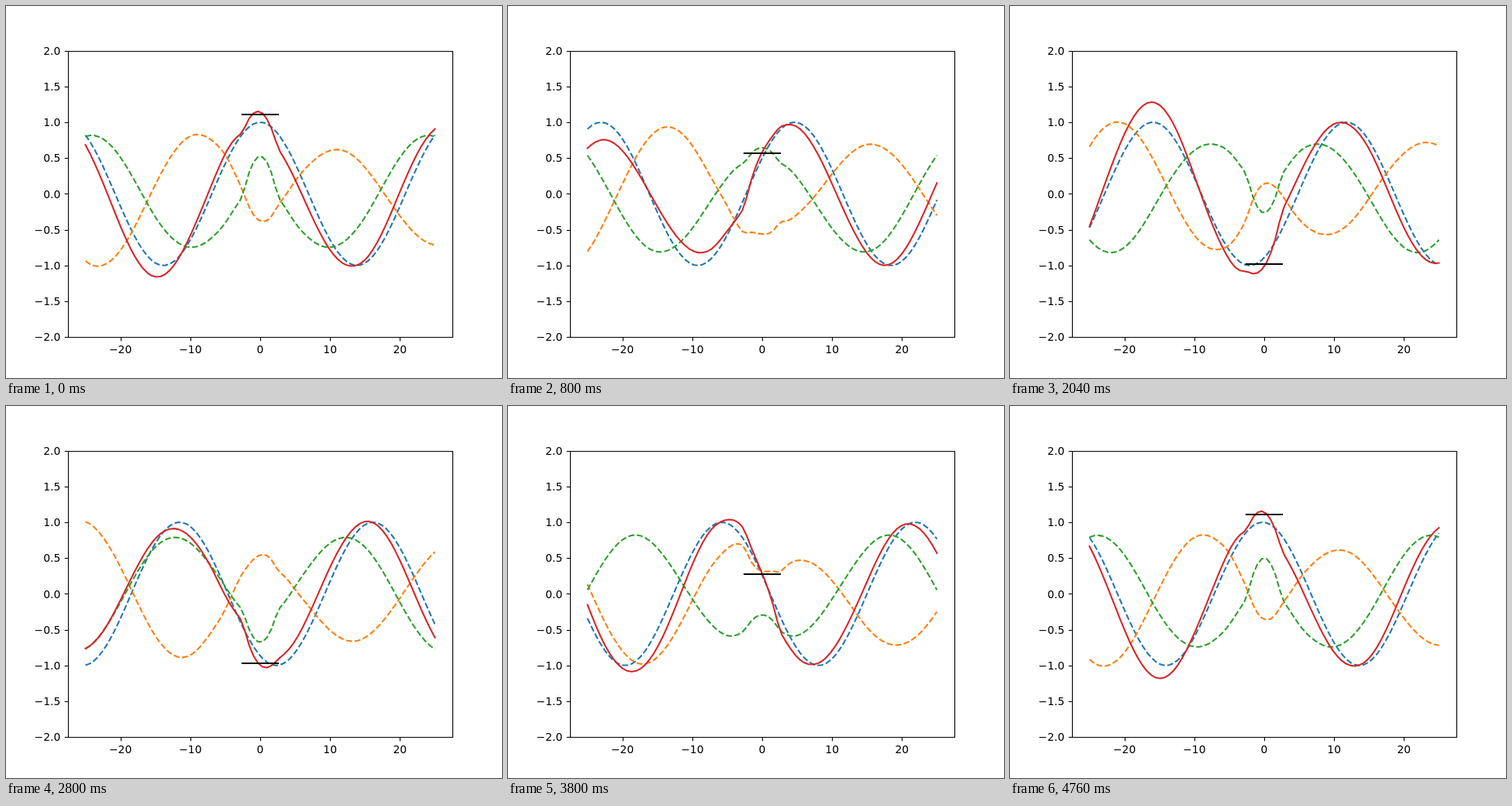
These frames come from a looping animation (640 by 480 pixels, 4.8 s). An HTML page with a canvas:

```html
<!DOCTYPE html>
<html lang="en">
<head>
<meta charset="utf-8">
<title>Waves around a floating body</title>
<style>
html, body { margin: 0; width: 640px; height: 480px; overflow: hidden; background: #fff; }
canvas { display: block; }
</style>
</head>
<body>
<canvas id="plot" width="640" height="480"></canvas>
<script>
const ctx = document.getElementById('plot').getContext('2d');
const FRAME_MS = 40, FRAMES = 120, POINTS = 80;
const REACH = 25, HALF_BODY = 2.5, WAVE_NUMBER = 0.22697;
const HEAVE = [1.11, 0.01];
const PX = 100 / 72;  // one typographic point
const DASH = [5.55 * PX, 2.4 * PX];

const toX = x => 328 + x * 496 / 55;
const toY = y => 242.4 - y * 92.4;
const crisp = v => Math.floor(v + 0.5) + 0.5;

// Outgoing-wave envelopes, sampled every 2.5 units from the edge of the body.
const heaveWave = {
  size: [.52, .64, .70, .756, .795, .815, .822, .822, .819, .816],
  phase: [1.08, 1.12, 1.09, 1.04, .965, .90, .865, .843, .822, .804]
};
const scatterRight = {
  size: [.383, .471, .545, .605, .655, .69, .71, .717, .719, .718],
  phase: [-2.57, -2.313, -2.29, -2.315, -2.36, -2.395, -2.455, -2.525, -2.585, -2.626]
};
const scatterLeft = {
  size: [.676, .745, .80, .865, .92, .96, .985, 1, 1.008, 1.015],
  phase: [-2.068, -1.89, -1.895, -1.9, -1.925, -1.97, -2.015, -2.06, -2.11, -2.139]
};

// Catmull-Rom interpolation with straight extension past both ends.
function sample(list, u) {
  const last = list.length - 1;
  const i = Math.min(Math.floor(u), last - 1), t = u - i;
  const b = list[i], c = list[i + 1];
  const a = i > 0 ? list[i - 1] : 2 * b - c;
  const d = i + 2 <= last ? list[i + 2] : 2 * c - b;
  return b + t / 2 * (c - a + t * (2 * a - 5 * b + 4 * c - d + t * (3 * (b - c) + d - a)));
}

const polar = (r, p) => [r * Math.cos(p), r * Math.sin(p)];

function outgoing(wave, distance) {
  const u = (distance - HALF_BODY) / 2.5;
  return polar(sample(wave.size, u), sample(wave.phase, u) + WAVE_NUMBER * distance);
}

const incident = x => polar(1, WAVE_NUMBER * x);

function scattered(x) {
  if (Math.abs(x) > HALF_BODY) return outgoing(x > 0 ? scatterRight : scatterLeft, Math.abs(x));
  return [
    -.38 - .042 * x + .052 * x * x,
    -.43 + .01 * x - .0128 * x * x + .0089 * x ** 3
  ];
}

function radiated(x) {
  if (Math.abs(x) > HALF_BODY) return outgoing(heaveWave, Math.abs(x));
  return [.525 - .09 * x * x, .444 + .012 * x * x];
}

const xs = Array.from({ length: POINTS }, (_, i) => -REACH + 2 * REACH * i / (POINTS - 1));
const parts = [incident, scattered, radiated].map(field => xs.map(field));
const total = xs.map((_, i) => [0, 1].map(j => parts.reduce((sum, part) => sum + part[i][j], 0)));
const curves = [
  { field: parts[0], color: '#1f77b4', dash: DASH },
  { field: parts[1], color: '#ff7f0e', dash: DASH },
  { field: parts[2], color: '#2ca02c', dash: DASH },
  { field: total, color: '#d62728', dash: [] }
];

function line(x1, y1, x2, y2) {
  ctx.beginPath();
  ctx.moveTo(x1, y1);
  ctx.lineTo(x2, y2);
  ctx.stroke();
}

function drawAxes() {
  const tick = 3.5 * PX;
  ctx.setLineDash([]);
  ctx.lineCap = 'butt';
  ctx.lineWidth = 0.8 * PX;
  ctx.strokeStyle = ctx.fillStyle = '#000';
  ctx.font = 10 * PX + 'px "DejaVu Sans", sans-serif';
  ctx.strokeRect(80.5, 58.5, 496, 369);
  const label = (value, digits) => value.toFixed(digits).replace('-', '\u2212');

  ctx.textAlign = 'center';
  for (let v = -20; v <= 20; v += 10) {
    const x = crisp(toX(v));
    line(x, 427.5, x, 427.5 + tick);
    ctx.fillText(label(v, 0), toX(v), 448);
  }
  ctx.textAlign = 'right';
  for (let v = -2; v <= 2; v += 0.5) {
    const y = crisp(toY(v));
    line(80.5, y, 80.5 - tick, y);
    ctx.fillText(label(v, 1), 70.3, Math.round(toY(v) + 5.2));
  }
}

function draw(now) {
  const angle = 2 * Math.PI * (Math.floor(now / FRAME_MS) % FRAMES) / FRAMES;
  const cos = Math.cos(angle), sin = Math.sin(angle);
  const height = ([re, im]) => re * cos + im * sin;

  ctx.fillStyle = '#fff';
  ctx.fillRect(0, 0, 640, 480);
  drawAxes();

  ctx.lineWidth = 1.5 * PX;
  ctx.lineJoin = 'round';
  for (const { field, color, dash } of curves) {
    ctx.strokeStyle = color;
    ctx.setLineDash(dash);
    ctx.lineCap = dash.length ? 'butt' : 'square';
    ctx.beginPath();
    xs.forEach((x, i) => ctx.lineTo(toX(x), toY(height(field[i]))));
    ctx.stroke();
  }

  ctx.strokeStyle = '#000';
  const y = Math.round(toY(height(HEAVE)));
  line(Math.round(toX(-HALF_BODY)), y, Math.round(toX(HALF_BODY)), y);
}

let start;
function tick(now) {
  start ??= now;
  draw(Math.max(0, now - start));
  requestAnimationFrame(tick);
}
draw(0);
requestAnimationFrame(tick);
</script>
</body>
</html>
```
